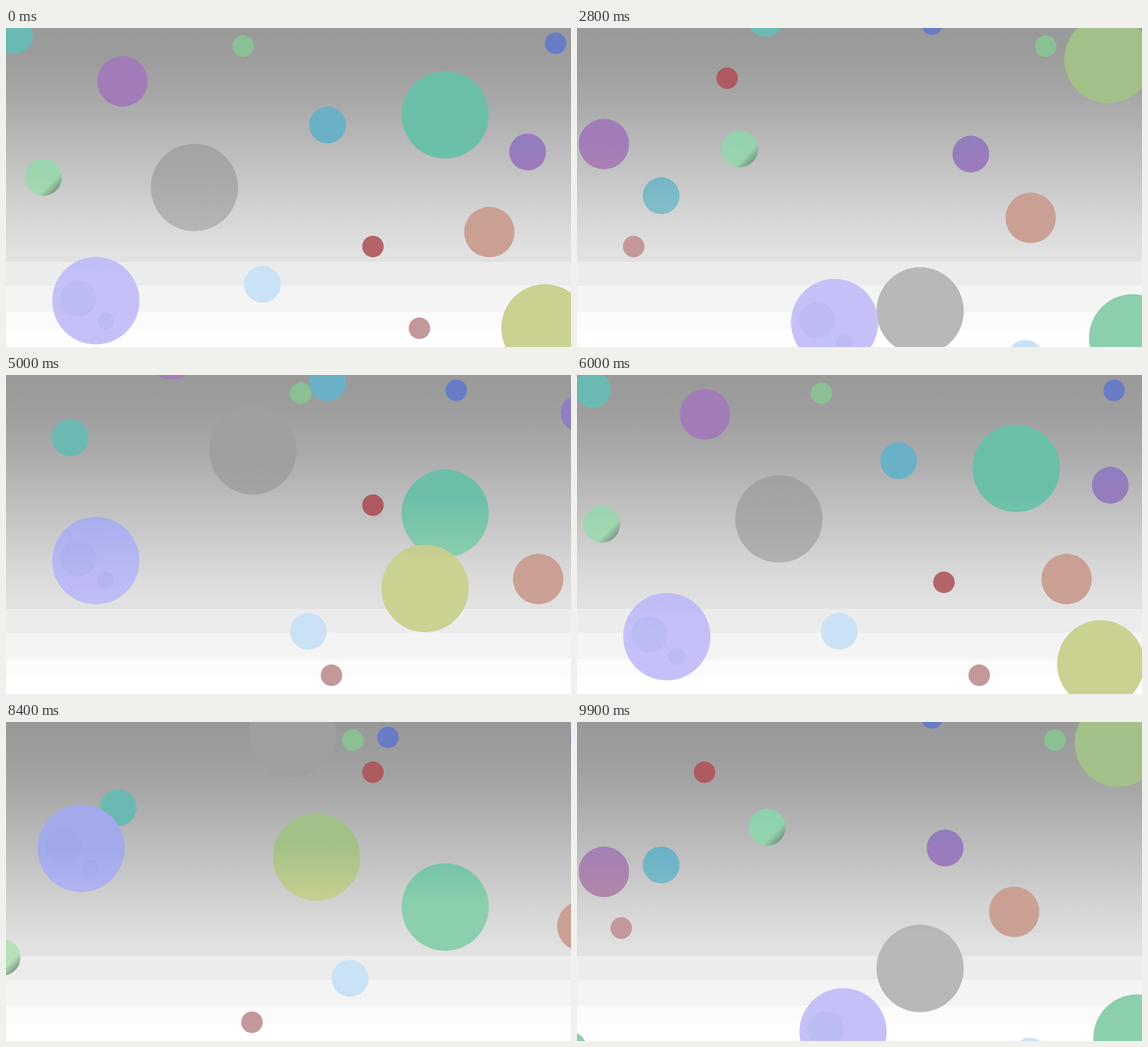
Recreate the animation shown at these times as an HTML page with a canvas. Size 997 by 562 pixels, loop 10000 ms.

```html
<!DOCTYPE html>
<html lang="en">
<head>
<meta charset="utf-8">
<title>Drifting circles</title>
<style>
html, body { margin: 0; width: 100%; height: 100%; overflow: hidden; background: #fff; }
canvas { display: block; }
</style>
</head>
<body>
<canvas id="stage" width="997" height="562"></canvas>
<script>
const W = 997, H = 562;
const STEP = 100, STEPS = 100, TURN = 32;   // the motion runs back after TURN steps
const SMALL = 19, MEDIUM = 32.5, LARGE = 44.5, HUGE = 77;
const ctx = document.getElementById('stage').getContext('2d');
const dots = [];

// Everything speeds up steadily along its path.
const ease = n => n * (n + 4);

// The tint of each circle shifts with its height on the stage.
function tint(colors, from) {
  const g = ctx.createLinearGradient(0, 0, 0, H);
  colors.forEach((c, i) => g.addColorStop(from + 0.2 * i, c));
  return g;
}

class Dot {
  constructor(r, x, y, colors, from = 0.4) {
    this.r = r;
    this.fill = tint(colors, from);
    this.legs = [];
    this.end = { n: 0, x, y };
    dots.push(this);
  }
  // Goes on by (dx, dy) until step n.
  move(n, dx, dy) {
    const a = this.end, b = { n, x: a.x + dx, y: a.y + dy };
    this.legs.push([a, b]);
    this.end = b;
    return this;
  }
  jump(x, y) {
    this.end = { n: this.end.n, x, y };
    return this;
  }
  with(detail) {
    this.detail = detail;
    return this;
  }
  at(n) {
    const [a, b] = this.legs.find(leg => n <= leg[1].n) || this.legs[this.legs.length - 1];
    const u = Math.min(1, (ease(n) - ease(a.n)) / (ease(b.n) - ease(a.n)));
    return [a.x + (b.x - a.x) * u, a.y + (b.y - a.y) * u];
  }
  draw(n) {
    const [x, y] = this.at(n);
    disc(x, y, this.r, this.fill);
    if (this.detail) this.detail(x, y, this.r);
  }
}

function disc(x, y, r, fill) {
  ctx.fillStyle = fill;
  ctx.beginPath();
  ctx.arc(x, y, r, 0, Math.PI * 2);
  ctx.fill();
}

function shade(x, y, r) {
  const g = ctx.createLinearGradient(x + r * 0.3, y + r * 0.4, x + r * 0.68, y + r * 0.78);
  g.addColorStop(0, 'rgba(95,115,100,0)');
  g.addColorStop(1, 'rgba(95,115,100,0.65)');
  disc(x, y, r, g);
}

function craters(x, y) {
  const dim = 'rgba(150,160,225,0.2)';
  disc(x - 31, y - 4, 32, dim);
  disc(x + 17.5, y + 35, 15, dim);
}

const green = new Dot(SMALL, 418.5, 32, ['#8bbf94'])
  .move(20, 193.5, 0).move(28, 215, 0).move(32, 69, 0);
const blue = new Dot(SMALL, 970, 27, ['#687cc6'])
  .move(14, -175.5, 0).move(20, -120.5, 0).move(24, -47.5, -34);
const aqua = new Dot(MEDIUM, 15, 13, ['#6abab3', '#8cccaf'])
  .move(17, 139, 138).move(20, 44, 0).move(24, 135, 0).move(28, 0, -168)
  .jump(-33, 596).move(32, 78, -78);
const purple = new Dot(LARGE, 205.5, 94, ['#a27cb8', '#b088a8'], 0.36)
  .move(6, 38, -46).move(20, 107, -185)
  .jump(47.5, -100).move(28, 0, 304.5).move(32, 0, 250);
const steel = new Dot(MEDIUM, 567.5, 171, ['#6ab1c8', '#86bfc8'])
  .move(20, 0, -300)
  .jump(148.5, 600).move(28, 0, -304.5).move(32, 0, -183);
const violet = new Dot(MEDIUM, 920.5, 218.5, ['#907ec0', '#a07ab9'], 0.3)
  .move(6, 38.5, -45.5).move(14, 52.5, -106).move(20, 16, -37)
  .jump(1030, 222).move(28, -335, 0).move(32, -191, 0);
const teal = new Dot(HUGE, 775, 153, ['#6bbfa8', '#8ccfac'], 0.38)
  .move(20, 0, 173).move(28, 205.5, 220).move(32, 32, 46);
const gray = new Dot(HUGE, 332.5, 281, ['#9f9f9f', '#a8a8a8', '#b8b8b8'], 0.27)
  .move(6, 44.5, -51.5).move(20, 128.5, -209.5).move(24, 50, -110)
  .jump(605.5, 700).move(28, 0, -201.5).move(32, 0, -270);
const mint = new Dot(MEDIUM, 66, 263, ['#8dd0ae', '#9fd6b0', '#b9e0b8'], 0.28)
  .move(18, -277, 0)
  .jump(-40, 437).move(20, 33, -22.5).move(28, 294, -201.5).move(32, 204, -116)
  .with(shade);
const salmon = new Dot(LARGE, 853, 359.5, ['#cba094'])
  .move(20, 164, 0).move(22, 27, -25).move(28, -243.5, 0).move(32, -122, 0);
const red = new Dot(SMALL, 647.5, 385, ['#ae5a60', '#b46468'], 0.45)
  .move(20, 0, -296.5).move(28, -382.5, 0).move(32, -168, 0);
const sky = new Dot(MEDIUM, 452.5, 451.5, ['#cae2f6'])
  .move(20, 154.5, 0).move(24, 53, 0).move(28, 131, 130.5).move(32, 34, 29);
const pink = new Dot(SMALL, 729.5, 529, ['#c4989a'])
  .move(20, -295.5, 0).move(24, -191, 0).move(28, -143, -144).move(32, -92, -92);
const olive = new Dot(HUGE, 951, 528.5, ['#a2c087', '#cbd191'], 0.38)
  .move(20, -403, -290.5).move(28, 389, -182.5).move(32, 76, -76);
const lavender = new Dot(HUGE, 158.5, 480.5, ['#a2aaec', '#b9b8f3', '#c5c1f8'])
  .move(14, 0, -153.5).move(20, -26, -104.5).move(28, 322, 296.5).move(32, 63, 113)
  .with(craters);

// Even grey levels fade downwards, then flat bands lead to white.
const fade = ctx.createLinearGradient(0, 0, 0, 396);
[153, 158, 169, 184, 198, 213, 225].forEach((v, i, all) =>
  fade.addColorStop(i / (all.length - 1), `rgb(${v},${v},${v})`));

function backdrop() {
  ctx.fillStyle = fade;
  ctx.fillRect(0, 0, W, H);
  for (const [y, v] of [[412, 236], [454, 244], [500, 251], [531, 255]]) {
    ctx.fillStyle = `rgb(${v},${v},${v})`;
    ctx.fillRect(0, y, W, H - y);
  }
}

function draw(time) {
  const k = Math.floor(time / STEP + 0.001) % STEPS % (2 * TURN);
  const n = Math.min(k, 2 * TURN - k);
  backdrop();
  dots.forEach(d => d.draw(n));
}

let start = null;
function tick(now) {
  if (start === null) start = now;
  draw(now - start);
  requestAnimationFrame(tick);
}
draw(0);
requestAnimationFrame(tick);
</script>
</body>
</html>
```
